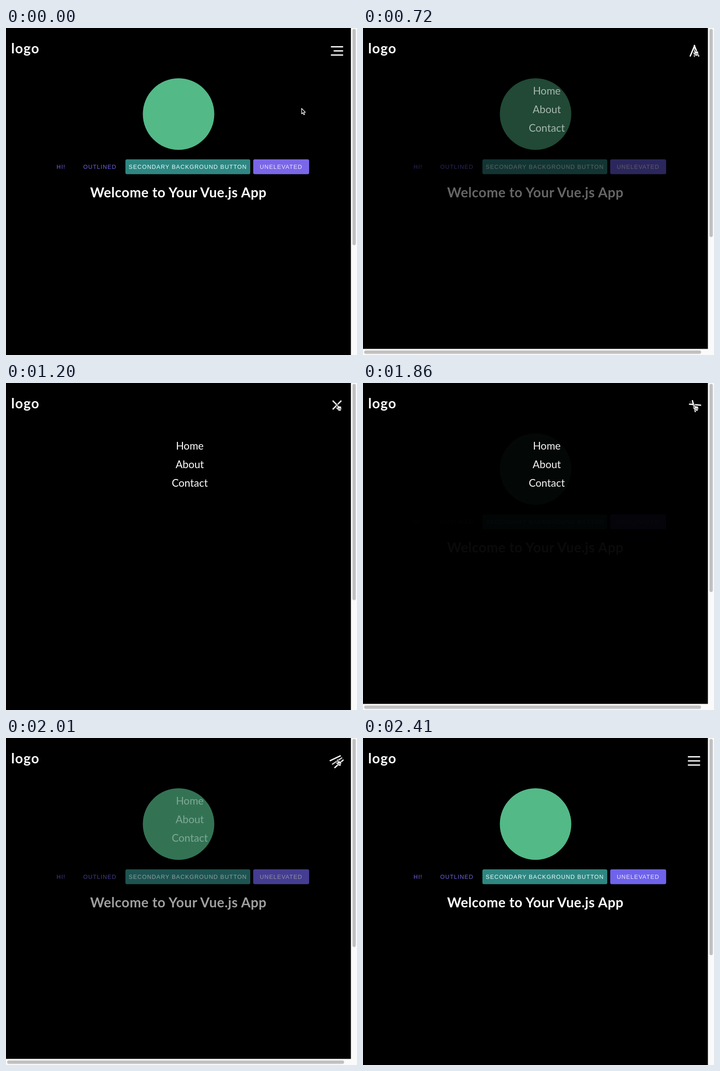
These frames come from a looping animation (776x722 px, 3070 ms). An HTML page:

```html
<!DOCTYPE html>
<html lang="en">
<head>
<meta charset="utf-8">
<title>Menu toggle</title>
<style>
  html, body { margin: 0; width: 100%; height: 100%; overflow: hidden; background: #000; }
  svg { display: block; width: 776px; height: 722px; }
  .head { font: 700 30px Lato, "Open Sans", sans-serif; letter-spacing: .56px; fill: #fff; }
  .brand { letter-spacing: 1.4px; }
  .link { font: 400 23px Lato, "Open Sans", sans-serif; text-anchor: middle; fill: #fff; }
  .btn { font: 400 12.74px "Liberation Sans", Arial, sans-serif; letter-spacing: 1.138px; }
  .bar { fill: #fff; }
  .thumb { fill: #c1c1c1; }
</style>
</head>
<body>
<svg viewBox="0 0 776 722">
  <rect width="776" height="722"/>
  <text class="head brand" x="11.5" y="55.5">logo</text>

  <g id="page">
    <circle cx="381.5" cy="190" r="79" fill="#53b987"/>
    <g class="btn">
      <text x="111.8" y="311" fill="#6e63e0">HI!</text>
      <text x="170.8" y="311" fill="#6e63e0">OUTLINED</text>
      <rect x="264" y="290" width="276" height="32.8" rx="3.6" fill="#2f8782"/>
      <text x="271.3" y="311" fill="#e6ffff">SECONDARY BACKGROUND BUTTON</text>
      <rect id="flat" x="546.5" y="290" width="123.7" height="32.8" rx="3.6"/>
      <text x="561" y="311" fill="#f0e6ff">UNELEVATED</text>
    </g>
    <text class="head" x="186" y="374">Welcome to Your Vue.js App</text>
  </g>

  <g id="menu">
    <text class="link" x="406.3" y="146.5">Home</text>
    <text class="link" x="406.3" y="187.5">About</text>
    <text class="link" x="406.3" y="228.5">Contact</text>
  </g>

  <g id="icon">
    <rect id="top" class="bar" x="-13.5" y="-1.4" width="27" height="2.8"/>
    <rect id="mid" class="bar" y="-1.4" height="2.8"/>
    <rect id="low" class="bar" x="-13.5" y="-1.4" width="27" height="2.8"/>
  </g>

  <rect x="762.5" width="13.5" height="722" fill="#fafafa"/>
  <rect id="vthumb" class="thumb" x="766" y="2" width="7.4" rx="3.7"/>
  <g id="hbar">
    <rect y="708.5" width="776" height="13.5" fill="#fafafa"/>
    <rect class="thumb" x="2.5" y="712" width="745" height="7.4" rx="3.7"/>
  </g>

  <path id="arrow" d="M0.5 0.5V12.6L3.3 10L5.3 14.6L7.4 13.7L5.4 9.2H9Z"
        fill="#111" stroke="#fff" stroke-width="1.2" stroke-linejoin="round"/>
  <g id="hand" transform="translate(728.5 46)">
    <path d="M4.4 9.4L3 2.2Q2.9 .7 4.1 .6Q5.2 .6 5.5 2L6.3 5.4Q7.3 4.2 8.4 5.3
             Q9.6 4.5 10.5 5.8Q12 5 12.7 6.7Q13.4 9.5 12.2 12.2V15.4H5.8V13.8
             Q3.4 11.8 1 9.2Q.3 8 1.5 7.4Q2.8 7.4 4.4 9.4Z"
          fill="#fff" stroke="#000" stroke-width=".9" stroke-linejoin="round"/>
    <path d="M6.9 9.4V12.8M8.7 9.4V12.8M10.5 9.4V12.8" stroke="#000" stroke-width=".7"/>
  </g>
</svg>
<script>
const LOOP = 3070;
const TICKS = [0, 80, 240, 320, 400, 480, 560, 640, 720, 800, 880, 960, 1040, 1120, 1200,
               1860, 1940, 2010, 2090, 2170, 2250, 2330, 2410];
const OPEN = 591, CLOSE = 1786, SPIN = 440;

const $ = id => document.getElementById(id);
const set = (id, key, value) => $(id).setAttribute(key, value);
const show = (id, on) => set(id, 'visibility', on ? 'visible' : 'hidden');
const ramp = (t, start, length) => Math.min(1, Math.max(0, (t - start) / length));

function bezier(x1, y1, x2, y2) {
  const at = (a, b, s) => 3 * a * s * (1 - s) ** 2 + 3 * b * s * s * (1 - s) + s ** 3;
  return x => {
    let lo = 0, hi = 1;
    for (let i = 0; i < 24; i++) {
      const s = (lo + hi) / 2;
      if (at(x1, x2, s) < x) lo = s; else hi = s;
    }
    return at(y1, y2, hi);
  };
}
const ease = bezier(.25, .1, .25, 1);
const easeInOut = bezier(.42, 0, .58, 1);

function drawIcon(t, spin, fade) {
  const gap = 9.1 * (1 - spin), lean = 45 * spin;
  const wide = 21 + 6 * ease(ramp(t, 200, 340));
  set('icon', 'transform', `translate(731.8 50.6) rotate(${-180 * spin}) translate(0 ${2 * spin})`);
  set('top', 'transform', `translate(0 ${-gap}) rotate(${lean})`);
  set('low', 'transform', `translate(0 ${gap}) rotate(${-lean})`);
  set('mid', 'x', 13.5 - wide);
  set('mid', 'width', wide);
  set('mid', 'opacity', Math.sqrt(fade));
}

function draw(t) {
  const closing = t >= CLOSE;
  const spin = ease(ramp(t, OPEN, SPIN)) - ease(ramp(t, CLOSE, SPIN));
  const fade = closing ? easeInOut(ramp(t, 1810, 350)) : 1 - easeInOut(ramp(t, OPEN, 230));
  const spinning = spin > 0 && spin < .9999;

  set('page', 'opacity', fade);
  set('menu', 'opacity', 1 - fade);
  set('flat', 'fill', t < 80 ? '#7a67e8' : t < 240 ? '#7566ea' : '#6e63ea');
  drawIcon(t, spin, fade);

  show('hbar', spinning);
  set('vthumb', 'height', spinning ? 459.5 : 477.5);
  show('arrow', t < 240);
  set('arrow', 'transform', t < 80 ? 'translate(653 177)' : 'translate(701 59)');
  show('hand', t >= 240 && t < 2410);
}

const begin = performance.now();
function frame() {
  const now = (performance.now() - begin) % LOOP;
  draw(TICKS.findLast(tick => tick <= now));
  requestAnimationFrame(frame);
}
draw(0);
requestAnimationFrame(frame);
</script>
</body>
</html>
```
